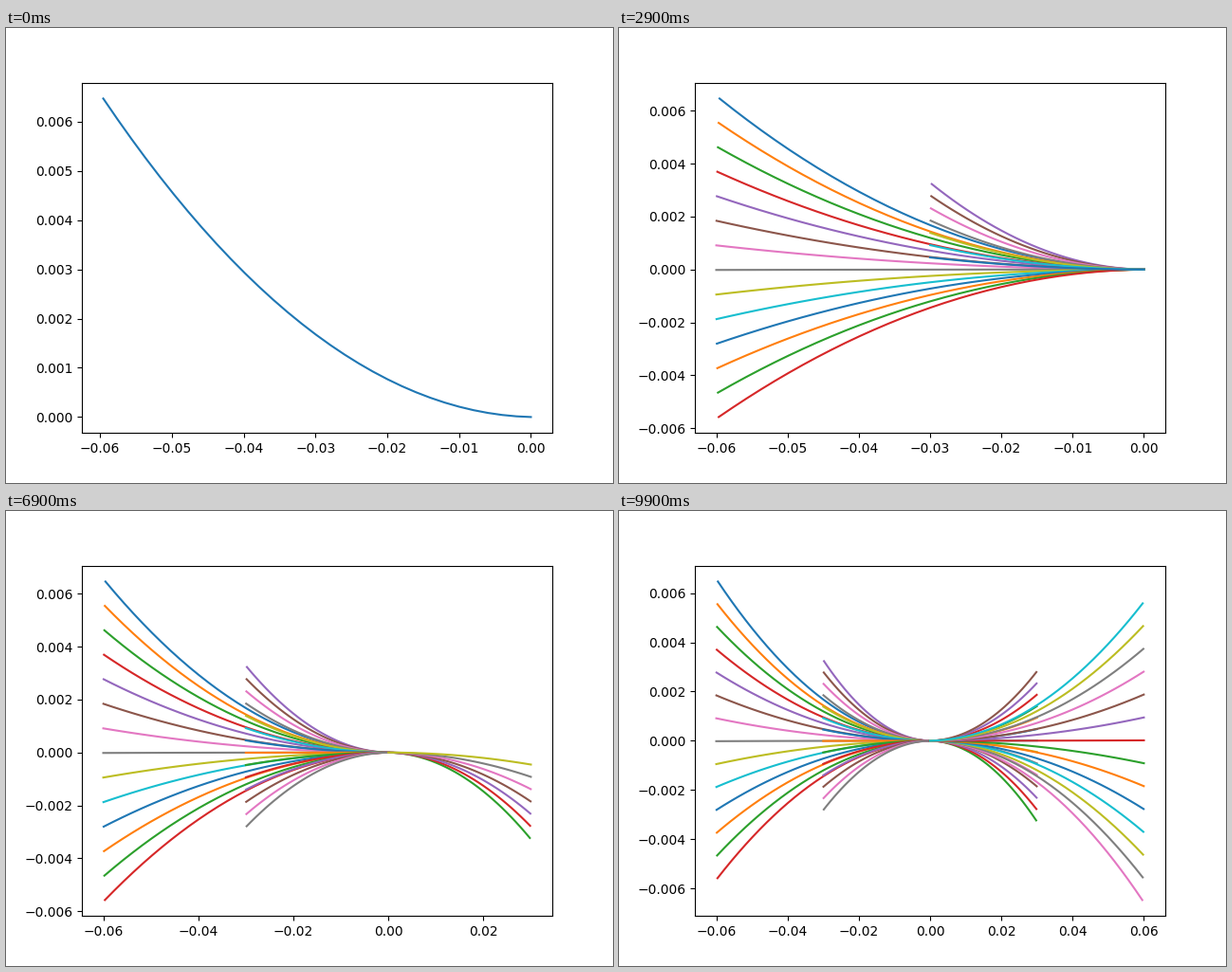
Recreate the animation shown at these times as a matplotlib script. Size 640 px wide and 480 px high, loop 10 s.

```python
import numpy as np
import matplotlib.pyplot as plt
from matplotlib.animation import FuncAnimation

DT = 0.1
STEPS = 30
FRAMES = 100

speeds = 0.01 * np.arange(-2, 3)
yaw_rates = -np.radians(4) + 0.01 * np.arange(14)


def trajectory(v, w):
    """Roll out a unicycle model from the origin at constant speed and yaw rate."""
    yaw = w * DT * np.arange(1, STEPS + 1)
    x = np.cumsum(v * np.cos(yaw) * DT)
    y = np.cumsum(v * np.sin(yaw) * DT)
    return np.r_[0, x], np.r_[0, y]


fig, ax = plt.subplots(figsize=(6.4, 4.8), dpi=100)
lines = [ax.plot(*trajectory(v, w))[0] for v in speeds for w in yaw_rates]


def update(frame):
    # 70 trajectories appear at 7 per second, snapped to 100 ms ticks
    newest = (14 * frame + 7) // 20
    for i, line in enumerate(lines):
        line.set_visible(i <= newest)
    ax.relim(visible_only=True)
    ax.autoscale_view()
    return lines


anim = FuncAnimation(fig, update, frames=FRAMES, interval=100,
                     init_func=lambda: update(0), repeat=True, repeat_delay=0)
plt.show()
```
